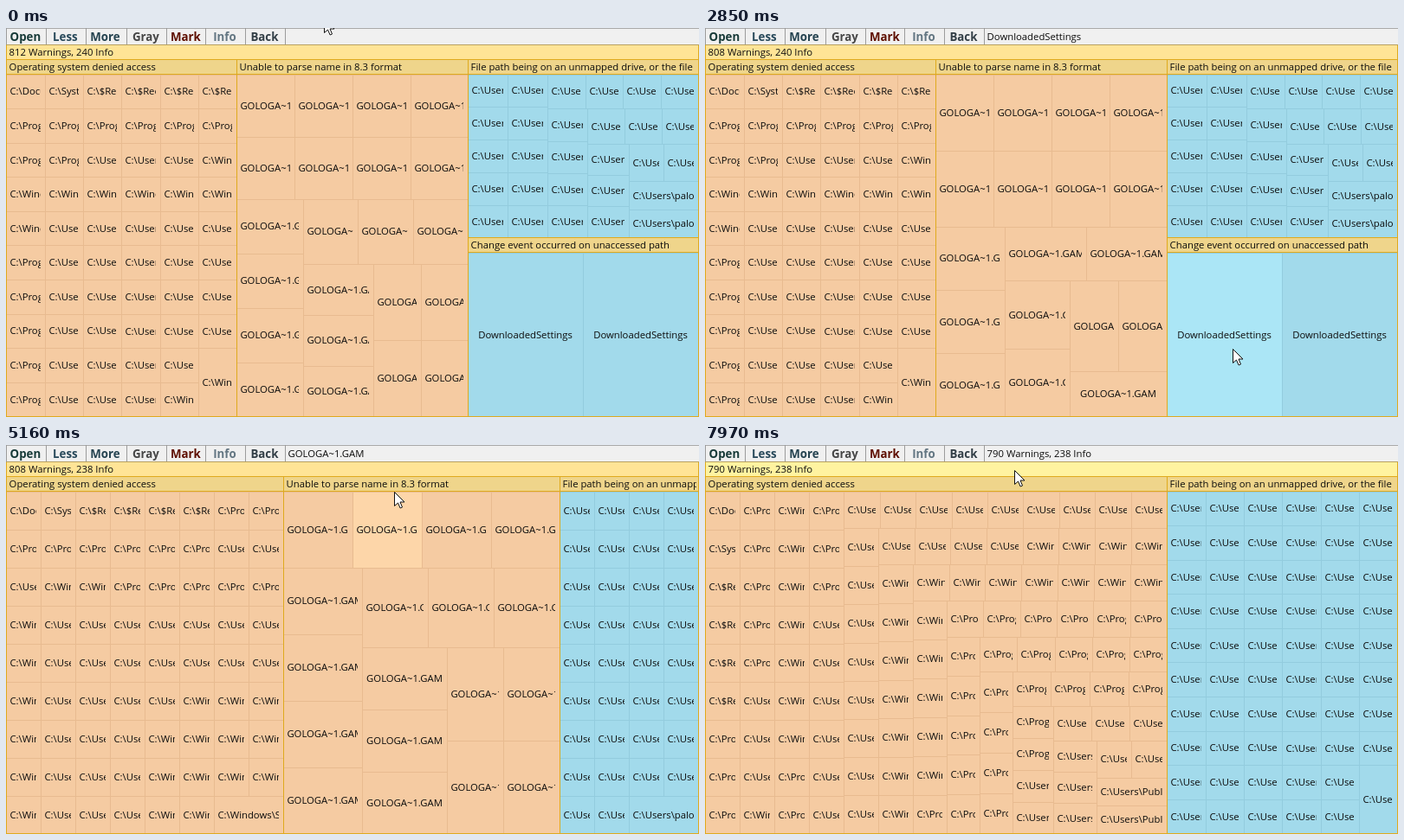
Recreate the animation shown at these times as an HTML page with a canvas. Size 800x450 px, loop 8000 ms.

```html
<!DOCTYPE html>
<html lang="en">
<head>
<meta charset="utf-8">
<title>Warning treemap</title>
<style>
  html, body { margin: 0; width: 100%; height: 100%; overflow: hidden; }
  canvas { display: block; width: 800px; height: 450px; }
</style>
</head>
<body>
<canvas id="stage" width="800" height="450"></canvas>
<script>
const ctx = document.getElementById('stage').getContext('2d');
const LOOP = 8000;
const FONT = '11.3px "Open Sans", "Noto Sans", sans-serif';
const BOLD = 'bold 13.3px "Open Sans", "Noto Sans", sans-serif';
const GOLD = '#dfaa1e';
const HEADER = 17;
const CELL_AREA = 1757;
const PRESS = 110;

const COLORS = {
  warn: { fill: '#f5cba2', line: '#e8bb90', hover: '#fdd6a9', press: '#fee9b6' },
  info: { fill: '#a2daeb', line: '#93ccde', hover: '#abe6f6', press: '#b9fdff' },
  group: { fill: '#efd58b', hover: '#ffe496', press: '#fff3a2' },
  root: { fill: '#ffe496', hover: '#fff3a0', press: '#fff3a0' }
};

const BUTTONS = [
  ['Open', 0, '#173a38'], ['Less', 46, '#28495a'], ['More', 92, '#24424f'],
  ['Gray', 139, '#474747'], ['Mark', 185, '#5e0f00'], ['Info', 230, '#637682'],
  ['Back', 276, '#333f47'], ['', 322, '#000']
];

// Clicks that dismiss one entry or a whole group.
const FILE_CLICKS = [790, 1290, 1800, 2310];
const INFO_CLICKS = [3050, 3620];
const GROUP_CLICK = 6650;
const CLICKS = [...FILE_CLICKS, ...INFO_CLICKS, GROUP_CLICK];

const POINTER = [
  [0, 367, -11], [680, 372, 246], [1030, 377, 258], [1750, 366, 276],
  [2240, 361, 285], [2380, 361, 285], [3000, 651, 386], [3520, 657, 392],
  [4200, 655, 389], [5100, 448, 54], [5640, 446, 54], [5760, 446, 53],
  [6500, 420, 43], [6730, 419, 43], [7150, 412, 43], [7970, 357, 29], [8000, 357, 29]
];

const DENIED = [
  ['Documents and Settings', 1], ['System Volume Information', 1],
  ['$Recycle.Bin', 4], ['Program Files\\Common', 8], ['Users\\Public\\Music', 3],
  ['Windows\\System32', 8], ['ProgramData\\Start Menu', 5],
  ['Users\\Public\\Videos', 27], ['Windows\\System32', 23],
  ['Program Files\\Common', 27], ['Users\\Public\\Pictures', 60]
].flatMap(([path, n]) => Array(n).fill('C:\\' + path));

const repeat = (text, n) => Array(n).fill(text);
const past = (clicks, t) => clicks.filter(c => t >= c).length;

// Equal cells laid out row by row; the last row takes whatever room is left.
function squarify(x, y, w, h, labels) {
  const units = Math.round(w * h / CELL_AREA);
  const capped = labels.length >= units;
  const count = capped ? units - 1 : labels.length;
  const area = w * h / (capped ? units : count);
  const cells = [];
  let i = 0;
  while (i < count) {
    const side = Math.min(w, h);
    const left = count - i;
    const ratio = k => {
      const r = k * k * area / (side * side);
      return Math.max(r, 1 / r);
    };
    let k = 1;
    while (k < left && ratio(k + 1) <= ratio(k)) k++;
    const across = w <= h;
    const depth = k === left ? Math.max(w, h) : k * area / side;
    const step = side / k;
    for (let j = 0; j < k; j++) {
      cells.push(across
        ? { x: x + j * step, y, w: step, h: depth, label: labels[i + j] }
        : { x, y: y + j * step, w: depth, h: step, label: labels[i + j] });
    }
    if (across) { y += depth; h -= depth; } else { x += depth; w -= depth; }
    i += k;
  }
  return cells;
}

function groupsAt(t) {
  const denied = { title: 'Operating system denied access', kind: 'warn', labels: DENIED };
  const parse = {
    title: 'Unable to parse name in 8.3 format', kind: 'warn',
    labels: repeat('GOLOGA~1.GAM', 22 - past(FILE_CLICKS, t))
  };
  const drive = {
    title: 'File path being on an unmapped drive, or the file', kind: 'info',
    labels: repeat('C:\\Users\\palo\\AppData\\Local', 99)
  };
  const change = {
    title: 'Change event occurred on unaccessed path', kind: 'info',
    labels: repeat('DownloadedSettings', 2 - past(INFO_CLICKS, t))
  };
  const place = (g, x0, x1, y0 = 36, y1 = 449) => ({ ...g, x0, x1, y0, y1 });
  if (t < INFO_CLICKS[1]) {
    return [place(denied, 0, 266), place(parse, 266, 533),
      place(drive, 533, 799, 36, 242), place(change, 533, 799, 242, 449)];
  }
  if (t < GROUP_CLICK) {
    return [place(denied, 0, 320), place(parse, 320, 639), place(drive, 639, 799)];
  }
  return [place(denied, 0, 533), place(drive, 533, 799)];
}

function pointerAt(t) {
  let i = 1;
  while (i < POINTER.length - 1 && t > POINTER[i][0]) i++;
  const [t0, x0, y0] = POINTER[i - 1];
  const [t1, x1, y1] = POINTER[i];
  const p = (t - t0) / (t1 - t0);
  const e = p * p * (3 - 2 * p);
  return { x: x0 + (x1 - x0) * e, y: y0 + (y1 - y0) * e };
}

function text(str, x, y, color = '#0c0c0c', font = FONT) {
  ctx.font = font;
  ctx.fillStyle = color;
  ctx.fillText(str, x, y);
}

function clipped(str, x, y, x0, x1) {
  ctx.save();
  ctx.beginPath();
  ctx.rect(x0, y - 16, x1 - x0, 24);
  ctx.clip();
  text(str, x, y);
  ctx.restore();
}

function rect(x, y, w, h, color) {
  ctx.fillStyle = color;
  ctx.fillRect(x, y, w, h);
}

function frame(x0, y0, x1, y1) {
  ctx.strokeStyle = GOLD;
  ctx.lineWidth = 1;
  ctx.strokeRect(x0 + 0.5, y0 + 0.5, x1 - x0, y1 - y0);
}

function draw(t) {
  const pointer = pointerAt(t);
  const pressed = CLICKS.some(c => t >= c - PRESS && t < c);
  const files = 22 - past(FILE_CLICKS, t);
  const warnings = 790 + (t < GROUP_CLICK ? files : 0);
  const summary = `${warnings} Warnings, ${240 - past(INFO_CLICKS, t)} Info`;
  let status = '';

  // Returns the fill of a box and reports its label when the pointer is on it.
  const shade = (kind, x, y, w, h, label) => {
    const c = COLORS[kind];
    const on = pointer.x >= x && pointer.x < x + w && pointer.y >= y && pointer.y < y + h;
    if (!on) return c.fill;
    status = label;
    return pressed ? c.press : c.hover;
  };

  ctx.textBaseline = 'alphabetic';
  rect(0, 0, 800, 450, '#f0f0f0');
  rect(0, 20, 800, 17, shade('root', 0, 20, 800, 16.5, summary));
  text(summary, 3.6, 32);

  for (const g of groupsAt(t)) {
    const { x0, x1, y0, y1, kind } = g;
    const w = x1 - x0;
    const top = y0 + HEADER;
    rect(x0, y0, w, HEADER, shade('group', x0, y0 + 0.5, w, HEADER, g.title));
    clipped(g.title, x0 + 3.6, y0 + 13, x0 + 2, x1 - 2);

    for (const c of squarify(x0 + 0.3, top + 0.5, w, y1 - top, g.labels)) {
      const x = Math.round(c.x), y = Math.round(c.y);
      const r = Math.round(c.x + c.w), b = Math.round(c.y + c.h);
      rect(x, y, r - x, b - y, COLORS[kind].line);
      rect(x + 1, y + 1, r - x - 1, b - y - 1, shade(kind, c.x, c.y, c.w, c.h, c.label));
      ctx.font = FONT;
      const centered = (x + r - ctx.measureText(c.label).width) / 2;
      clipped(c.label, Math.max(x + 4.4, centered), Math.round(c.y + c.h / 2) + 4, x + 3, r - 5);
    }
    frame(x0, y0, x1, y1);
    rect(x0, top, w, 1, GOLD);
  }
  frame(0, 19, 799, 449);

  rect(0, 0, 800, 19, '#f0f0f0');
  rect(0, 0, 800, 1, '#a9a9a9');
  rect(0, 19, 800, 1, '#b7a160');
  for (const [name, x, color] of BUTTONS) {
    rect(x, 0, 1, 19, '#9c9c9c');
    ctx.textAlign = 'center';
    text(name, x + 22.4, 15, color, BOLD);
    ctx.textAlign = 'left';
  }
  text(status, 325.6, 14);
  drawPointer(pointer);
}

function drawPointer({ x, y }) {
  ctx.save();
  ctx.translate(Math.round(x) + 0.5, Math.round(y) + 0.5);
  ctx.beginPath();
  [[0, 0], [0, 16], [4, 12.5], [6.6, 18.5], [9, 17.5], [6.5, 11.5], [11.5, 11.5]]
    .forEach(([px, py]) => ctx.lineTo(px, py));
  ctx.closePath();
  ctx.fillStyle = '#fff';
  ctx.fill();
  ctx.strokeStyle = '#111';
  ctx.lineWidth = 1;
  ctx.stroke();
  ctx.restore();
}

const start = performance.now();
function tick() {
  draw((performance.now() - start) % LOOP);
  requestAnimationFrame(tick);
}
tick();
</script>
</body>
</html>
```
